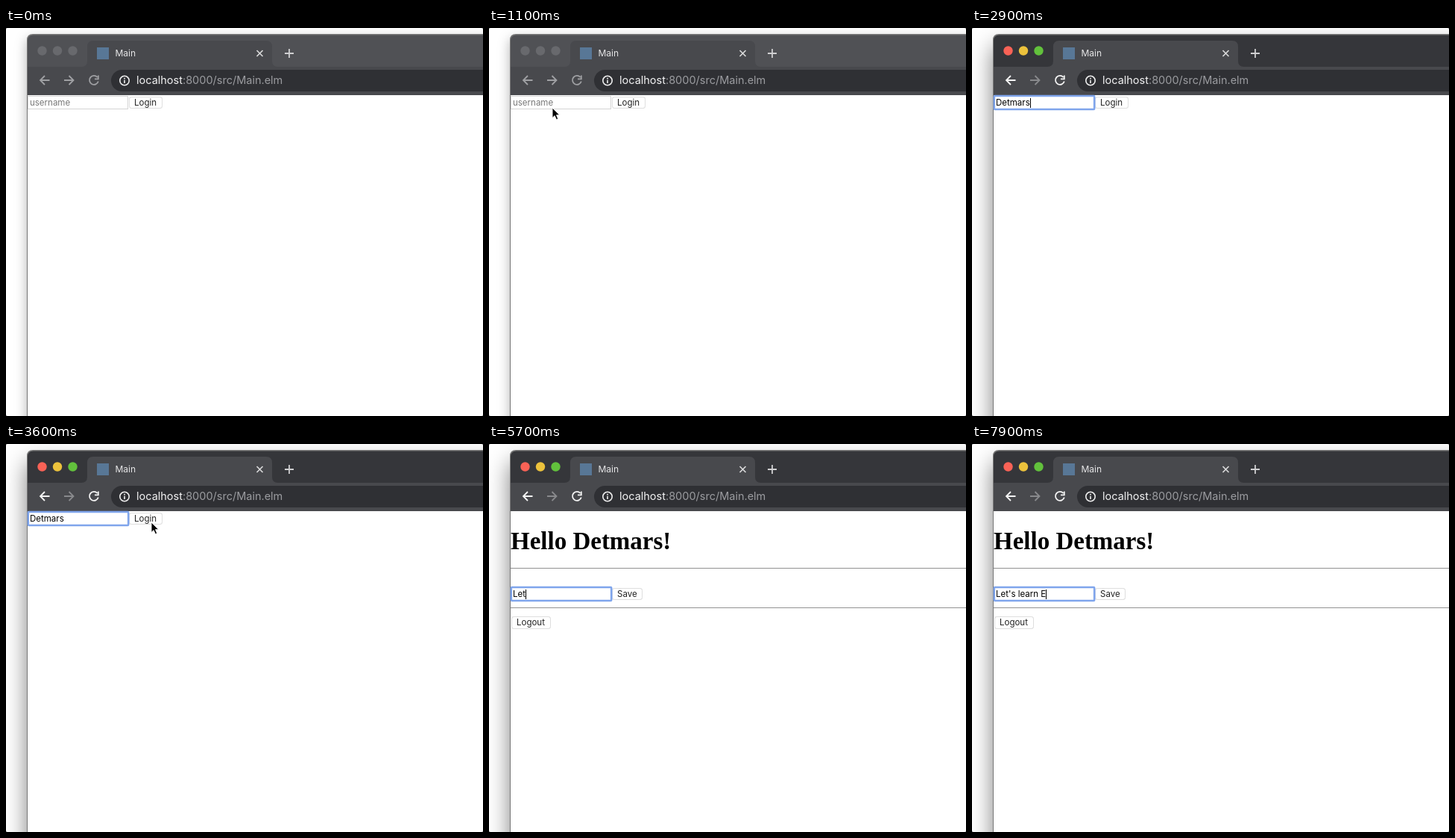
Animation, 640 px wide and 520 px high, one loop 8 s. Source, as an HTML page:

```html
<!DOCTYPE html>
<html lang="en">
<head>
<meta charset="utf-8">
<style>
  html, body { margin: 0; height: 100%; overflow: hidden; background: #666; }
  svg { display: block; background: #fff; border-radius: 2px; }
  text { font: 11.5px Inter, sans-serif; fill: #222; white-space: pre; }
  .line { fill: none; stroke-width: 1.8; stroke: #9fa0a3; }
  .strip { fill: #505155; }
  .bar { fill: #48494d; }
  .light { fill: #68696d; }
  #frame { filter: drop-shadow(0 6px 8px rgba(0, 0, 0, .3)); }
  .active #frame { filter: drop-shadow(0 16px 15px rgba(0, 0, 0, .5)); }
  .active .strip { fill: #35363a; }
  .active .light { fill: var(--c); }
  .active .on { stroke: #f4f4f4; }
  .active .off { stroke: #88898c; }
  .box { fill: #fff; stroke: #d4d4d4; }
  .button { fill: #fff; stroke: #dedede; filter: drop-shadow(0 .7px .3px rgba(0, 0, 0, .2)); }
  .ring { fill: none; stroke: #7fa5ec; stroke-width: 2.6; }
  .hint { fill: #777; }
  .typed { fill: #000; }
  .rule { stroke: #929292; }
</style>
</head>
<body>
<svg id="stage" width="640" height="520" viewBox="0 0 640 520">
  <path id="frame" fill="#777" d="M28 620V16q0-8 8-8H740V620z"/>
  <path class="strip" d="M29 90V17q0-7.5 7.5-7.5H640V90z"/>
  <path class="bar" d="M29 90V52H101q8 0 8-8V25q0-8 8-8H349q8 0 8 8V44q0 8 8 8H640V90z"/>
  <circle class="light" style="--c:#f96256" cx="48.5" cy="30.5" r="6.2"/>
  <circle class="light" style="--c:#ecc23c" cx="69" cy="30.5" r="6.2"/>
  <circle class="light" style="--c:#62c13c" cx="89.5" cy="30.5" r="6.2"/>
  <rect x="122" y="26" width="16" height="16" fill="#587796"/>
  <text x="146.5" y="38" style="font-size:12px;fill:#e6e6e7">Main</text>
  <path class="line" style="stroke:#dcdcdd;stroke-width:1.6" d="M336.5 30l8 8m0-8l-8 8"/>
  <path class="line" style="stroke:#cfcfd1" d="M374 34h12m-6-6v12"/>
  <path class="line on" d="M58.5 70H46m6-6l-6 6 6 6"/>
  <path class="line off" d="M78 70H90.5m-6-6l6 6-6 6"/>
  <path class="line on" d="M122.6 66a6 6 0 1 0 1.2 5.5M123.8 63.5v4.8h-4.8"/>
  <rect x="141" y="56" width="540" height="29" rx="14.5" fill="#2f3034"/>
  <circle class="line" cx="159" cy="70.5" r="6.2" style="stroke:#eee;stroke-width:1.6"/>
  <path class="line" style="stroke:#eee;stroke-width:1.6" d="M159 66.7v1.7m0 1.3v4.4"/>
  <text x="175" y="75" style="font-size:14.5px;fill:#9b9ca0"><tspan fill="#f2f2f3">localhost</tspan>:8000/src/Main.elm</text>
  <path fill="#fff" d="M29 90H640V520H29z"/>

  <g id="login">
    <rect class="button" x="165.5" y="92.5" width="44" height="15" rx="3"/>
    <text x="172" y="104">Login</text>
  </g>
  <g id="home">
    <text x="29" y="141" style="font:bold 33px 'Liberation Serif',serif;fill:#000">Hello Detmars!</text>
    <path class="rule" d="M29 166.5H640M29 219.5H640"/>
    <rect class="button" x="165.5" y="193.5" width="40" height="15" rx="3"/>
    <text x="172" y="205">Save</text>
    <rect class="button" x="30.5" y="231.5" width="52" height="16" rx="3"/>
    <text x="37" y="243">Logout</text>
  </g>
  <g id="field">
    <rect class="box" x="29.5" y="91.5" width="134" height="17"/>
    <rect class="ring" x="29.8" y="91" width="134.4" height="18" rx="1"/>
    <text id="value" x="32" y="104"></text>
    <path id="caret" stroke="#000" d="M.5 94v13"/>
  </g>

  <g id="mouse">
    <path id="arrow" stroke="#fff" stroke-width=".9" d="M0 0V13.5L3.1 10.6 5.4 15.7 7.7 14.7 5.5 9.7H9.8z"/>
    <g id="beam" fill="none">
      <path stroke="#fff" stroke-width="2.6" d="M0-7V7"/>
      <path stroke="#222" stroke-width="1.4" d="M-3.5-8Q0-8 0-6V6Q0 8-3.5 8M3.5-8Q0-8 0-6V6Q0 8 3.5 8M-2 3.5H2"/>
    </g>
  </g>
</svg>
<script>
const $ = id => document.getElementById(id);
const show = (id, on) => $(id).style.display = on ? '' : 'none';

const LOOP = 8000, ACTIVATE = 1200, LOGIN = 3900;
const pages = [
  { hint: 'username', text: 'Detmars', focus: 1300, dy: 0,
    keys: [2300, 2400, 2500, 2600, 2700, 2800, 2900] },
  { hint: 'leave comment', text: "Let's learn E", focus: 4900, dy: 101,
    keys: [5300, 5450, 5600, 6000, 6150, 6300, 6450, 6550, 6700, 7000, 7100, 7250, 7500] }
];
// time, x, y
const path = [
  [100, 362, 488], [600, 88, 110], [900, 85, 107], [3000, 150, 109],
  [3400, 195, 105], [LOGIN, 195, 105], [4500, 108, 195], [LOOP, 108, 195]
];

function pointer(t) {
  // The pointer rests in the field, then reappears after typing
  if (t >= 900 && t < 2300) return [85, 107];
  const i = Math.max(1, path.findIndex(p => p[0] > t));
  const [t0, x0, y0] = path[i - 1], [t1, x1, y1] = path[i];
  const u = Math.max(0, (t - t0) / (t1 - t0)), e = u * u * (3 - 2 * u);
  return [x0 + (x1 - x0) * e, y0 + (y1 - y0) * e];
}

function draw(t) {
  const home = t >= LOGIN, page = pages[+home];
  const active = t >= ACTIVATE, focused = t >= page.focus;
  $('stage').classList.toggle('active', active);
  show('login', !home);
  show('home', home);

  const pressed = page.keys.filter(k => k <= t);
  const value = $('value');
  value.textContent = page.text.slice(0, pressed.length) || page.hint;
  value.setAttribute('class', pressed.length ? 'typed' : 'hint');
  $('field').setAttribute('transform', `translate(0 ${page.dy})`);
  document.querySelector('.ring').style.display = focused ? '' : 'none';

  const since = t - (pressed.at(-1) ?? page.focus);
  const end = pressed.length ? value.getComputedTextLength() : 0;
  show('caret', focused && since % 1000 < 500);
  $('caret').setAttribute('transform', `translate(${Math.round(32 + end)} 0)`);

  const [x, y] = pointer(t);
  const over = active && x < 164 && Math.abs(y - 100 - page.dy) < 11;
  show('mouse', t >= 100 && t < 2300 || t >= 3000 && t < 5300);
  show('arrow', !over);
  show('beam', over);
  $('mouse').setAttribute('transform', `translate(${x} ${y})`);
}

const start = performance.now();
function tick() {
  const t = (performance.now() - start) % LOOP;
  draw(Math.floor(t / 100) * 100);
  requestAnimationFrame(tick);
}
tick();
</script>
</body>
</html>
```
